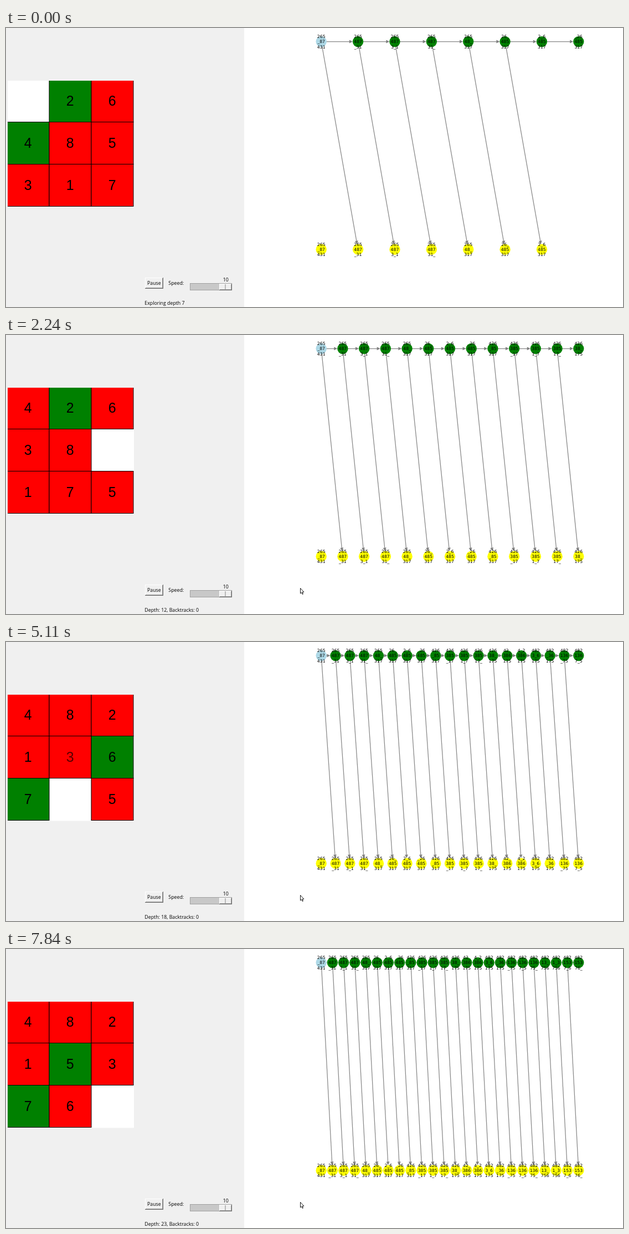
Write an HTML page with a canvas that moves like this. It is 1114 px wide and 503 px high and loops after 8 s.

```html
<!DOCTYPE html>
<html lang="en">
<head>
<meta charset="utf-8">
<title>8-puzzle depth-first search</title>
<style>
html, body { margin: 0; width: 100%; height: 100%; overflow: hidden; background: #fff; }
canvas { display: block; }
</style>
</head>
<body>
<canvas id="stage" width="1114" height="503"></canvas>
<script>
const ctx = document.getElementById('stage').getContext('2d');
const LOOP = 8000;
const UI_FONT = '8.8px "Open Sans", "Noto Sans", sans-serif';
const NODE_FONT = '7.7px "DejaVu Sans", sans-serif';
const TILE_FONT = '25px "Liberation Sans", Arial, sans-serif';
const GOAL = '12345678_';
const TOP = 24.6, BOTTOM = 399.2, RADIUS = 9.7;

// Every depth has three steps: tree grows, board moves, node is marked visited.
const TIMES = [
  0, 70, 270, 410, 470, 690, 830, 890, 1110, 1250, 1310,
  1580, 1710, 1780, 2040, 2170, 2240, 2440, 2580, 2640,
  2910, 3040, 3110, 3370, 3510, 3580, 3840, 3970, 4040,
  4310, 4450, 4580, 4850, 4980, 5110, 5380, 5510, 5640,
  5910, 6040, 6180, 6440, 6570, 6710, 6970, 7100, 7240,
  7500, 7640, 7770
];
const FIRST_DEPTH = 7;
const CURSOR_TIME = 600;

// Boards along the path, from the moves of the empty cell.
const boards = ['265_87431'];
for (const move of 'DRRUULLDDRRUULDLDRRULDR') {
  const cells = [...boards[boards.length - 1]];
  const from = cells.indexOf('_');
  const to = from + { U: -3, D: 3, L: -1, R: 1 }[move];
  [cells[from], cells[to]] = [cells[to], '_'];
  boards.push(cells.join(''));
}

function text(str, x, y, font, align = 'left', color = '#000') {
  ctx.font = font;
  ctx.textAlign = align;
  ctx.fillStyle = color;
  ctx.fillText(str, x, y);
}

function box(x, y, w, h, color) {
  ctx.fillStyle = color;
  ctx.fillRect(x, y, w, h);
}

function poly(points, fill) {
  ctx.beginPath();
  points.forEach(([x, y]) => ctx.lineTo(x, y));
  ctx.closePath();
  ctx.fillStyle = fill;
  ctx.fill();
}

// Raised widget with a light top left and a dark bottom right edge.
function raised(x, y, w, h) {
  box(x, y, w, h, '#696969');
  box(x, y, w - 1, h - 1, '#fff');
  box(x + 1, y + 1, w - 2, h - 2, '#a0a0a0');
  box(x + 1, y + 1, w - 3, h - 3, '#f0f0f0');
}

function drawBoard(board) {
  ctx.save();
  ctx.beginPath();
  ctx.rect(3, 95, 228, 227.5);
  ctx.clip();
  box(3, 95, 228, 228, '#fff');
  ctx.strokeStyle = '#000';
  ctx.lineWidth = 1;
  [...board].forEach((digit, i) => {
    if (digit === '_') return;
    const x = 2 + i % 3 * 76, y = 93.5 + Math.floor(i / 3) * 76;
    box(x, y, 76, 76, digit === GOAL[i] ? '#008000' : '#f00');
    ctx.strokeRect(x, y, 76, 76);
    const faded = digit === '3' && i === 4;
    text(digit, x + 37.6, y + 46.5, TILE_FONT, 'center', faded ? '#580000' : '#000');
  });
  ctx.restore();
}

function drawControls(status) {
  raised(251, 450, 33, 20);
  text('Pause', 255, 463.2, UI_FONT);
  text('Speed:', 293.3, 463.2, UI_FONT);
  text('10', 396.7, 456.8, UI_FONT, 'center');
  box(332, 460, 76, 13, '#a0a0a0');
  box(333, 461, 74, 11, '#c8c8c8');
  raised(385, 461, 23, 12);
  box(395.5, 462, 1, 9, '#808080');
  text(status, 250.3, 498.8, UI_FONT);
}

function drawEdge(x1, y1, x2, y2) {
  const length = Math.hypot(x2 - x1, y2 - y1);
  const dx = (x2 - x1) / length, dy = (y2 - y1) / length;
  const tipX = x2 - dx * RADIUS, tipY = y2 - dy * RADIUS;
  ctx.beginPath();
  ctx.moveTo(x1, y1);
  ctx.lineTo(tipX - dx * 2, tipY - dy * 2);
  ctx.strokeStyle = '#888';
  ctx.lineWidth = 1.25;
  ctx.stroke();
  const backX = tipX - dx * 6, backY = tipY - dy * 6;
  poly([[tipX, tipY], [backX - dy * 3, backY + dx * 3], [backX + dy * 3, backY - dx * 3]], '#808080');
}

function drawNode(x, y, color) {
  ctx.beginPath();
  ctx.arc(x, y, RADIUS, 0, 7);
  ctx.fillStyle = color;
  ctx.fill();
}

function drawTree(depth, visited) {
  const at = i => 569.2 + i * 464.6 / depth;
  for (let i = 0; i < depth; i++) {
    drawEdge(at(i), TOP, at(i + 1), TOP);
    if (i + 1 < visited) drawEdge(at(i), TOP, at(i + 1), BOTTOM);
  }
  for (let i = 0; i <= depth; i++) {
    drawNode(at(i), TOP, i ? '#008000' : '#add8e6');
    if (i < visited) drawNode(at(i), BOTTOM, '#ff0');
  }
  for (let i = 0; i <= depth; i++) {
    for (let row = 0; row < 3; row++) {
      const label = boards[i].slice(row * 3, row * 3 + 3);
      const dy = 2.8 + (row - 1) * 9.1;
      text(label, at(i), TOP + dy, NODE_FONT, 'center');
      if (i < visited) text(label, at(i), BOTTOM + dy, NODE_FONT, 'center');
    }
  }
}

function drawCursor(x, y) {
  const shape = [[0, 0], [0, 9.5], [2.1, 7.6], [3.6, 11], [5, 10.4], [3.6, 7.1], [6.3, 6.8]];
  poly(shape.map(([a, b]) => [x + a, y + b]), '#fff');
  ctx.strokeStyle = '#000';
  ctx.lineWidth = 0.9;
  ctx.stroke();
}

function draw(now) {
  const t = now % LOOP;
  const step = TIMES.filter(time => time <= t).length;
  const depth = FIRST_DEPTH + Math.floor(step / 3);
  const phase = step % 3;
  const done = phase === 2;
  box(0, 0, 1114, 503, '#fff');
  box(0, 0, 430, 503, '#f0f0f0');
  drawBoard(boards[phase ? depth : depth - 1]);
  drawControls(done ? `Depth: ${depth}, Backtracks: 0` : `Exploring depth ${depth}`);
  drawTree(depth, done ? depth + 1 : depth);
  if (t >= CURSOR_TIME) drawCursor(531.5, 456.5);
}

function tick() {
  draw(performance.now());
  requestAnimationFrame(tick);
}
tick();
</script>
</body>
</html>
```
